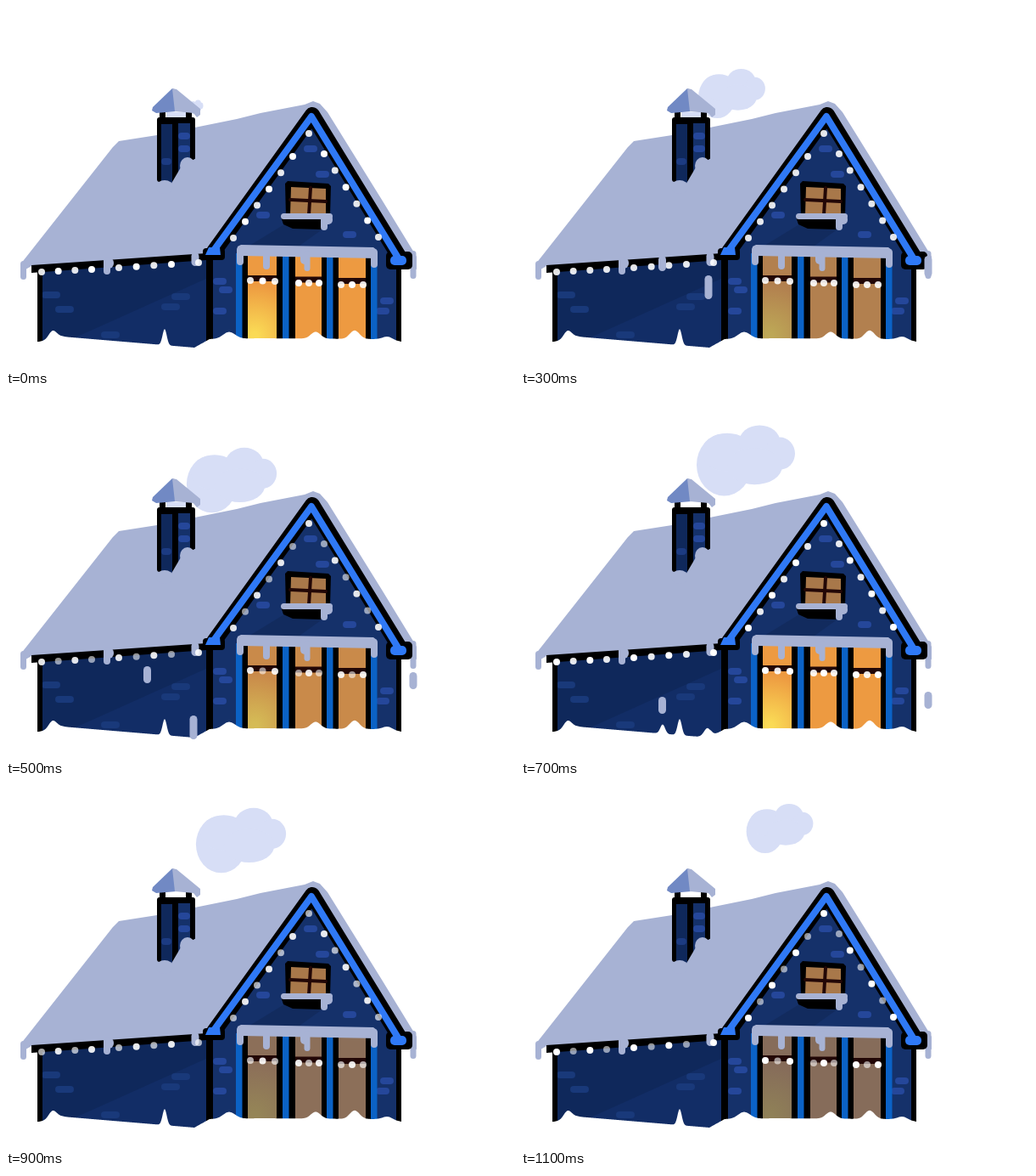
Animation of 600x426 px, one loop 1.2 s. Source, as an HTML page with a canvas:

```html
<!DOCTYPE html>
<html lang="en">
<head>
<meta charset="utf-8">
<title>Snowy house</title>
<style>
html, body { margin: 0; width: 100%; height: 100%; overflow: hidden; background: #fff; }
canvas { display: block; width: 600px; height: 426px; }
</style>
</head>
<body>
<canvas id="stage" width="600" height="426"></canvas>
<script>
const ctx = document.getElementById('stage').getContext('2d');
const SNOW = '#a7b2d4', WALL = '#15316a', SIDE = '#0f285b', TRIM = '#0b62c6';
const BLUE = '#2f79f6', BROWN = '#220706', MIST = '#d7def6';
const STEP = 100, COUNT = 12;

const mix = (a, b, k) => a + (b - a) * k;
const blend = (a, b, k) => 'rgb(' + a.map((v, i) => Math.round(mix(v, b[i], k))) + ')';
const wave = (step, peak, period) => Math.cos((step - peak) / period * 2 * Math.PI);

// Straight-line path through points [at, value, ...]
function along(points, at) {
  let i = 0;
  while (i < points.length - 2 && points[i + 1][0] <= at) i++;
  const a = points[i], b = points[i + 1], k = (at - a[0]) / (b[0] - a[0]);
  return a.slice(1).map((v, j) => mix(v, b[j + 1], k));
}

function rect(color, x1, y1, x2, y2, r = 0) {
  ctx.fillStyle = color;
  ctx.beginPath();
  ctx.roundRect(x1, y1, x2 - x1, y2 - y1, r);
  ctx.fill();
}
function oval(color, x, y, rx, ry = rx) {
  ctx.fillStyle = color;
  ctx.beginPath();
  ctx.ellipse(x, y, rx, ry, 0, 0, Math.PI * 2);
  ctx.fill();
}
function trace(p) {
  ctx.beginPath();
  for (let i = 0; i < p.length; i += 2) ctx.lineTo(p[i], p[i + 1]);
}
function poly(color, ...p) {
  ctx.fillStyle = color;
  trace(p);
  ctx.fill();
}
function line(color, width, ...p) {
  ctx.strokeStyle = color;
  ctx.lineWidth = width;
  ctx.lineJoin = ctx.lineCap = 'round';
  trace(p);
  ctx.stroke();
}
function bricks(color, half, ...spots) {
  for (const [x, y] of spots) rect(color, x - half, y - 4, x + half, y + 4, 4);
}
const icicle = (x, top, bottom, w = 8) => rect(SNOW, x - w / 2, top, x + w / 2, bottom, w / 2);

// The cloud keeps its shape, swells and shrinks, and drifts along a path.
const DRIFT = [[0, 224, 119], [2, 239, 108], [4, 258, 98], [5, 266, 99], [7, 265, 76], [9, 277, 64], [11, 305, 50]];
const PUFFS = [[-.22, .06, .28, .44], [-.19, -.12, .26, .27], [.14, -.26, .21, .24], [.345, -.1, .155, .23], [.09, .08, .28, .26]];

function smoke(step) {
  const [x, y] = along(DRIFT, step), swell = Math.sin(step / 14 * Math.PI);
  const w = 17 + 99 * swell, h = 17 + 66 * swell;
  for (const [dx, dy, rx, ry] of PUFFS) oval(MIST, x + dx * w, y + dy * h, rx * w, ry * h);
}

function sideWall() {
  poly(SIDE, 38, 308, 240, 294, 240, 404, 38, 404);
  poly('#122d66', 82, 390, 238, 320, 238, 404, 82, 404);
  bricks('#19397a', 11, [53, 340], [69, 357], [206, 342], [194, 354], [123, 387]);
  rect('#000', 37, 310, 43, 396);
}

function roof() {
  poly(SNOW, 17, 304, 126, 166, 133, 159, 178, 152, 272, 133, 300, 126, 352, 116, 362, 112,
    370, 115, 379, 125, 443, 228, 484, 295, 484, 310, 460, 304, 360, 150, 240, 293, 30, 306, 18, 313);
  icicle(20.5, 300, 322, 7);
  icicle(480, 288, 321, 7);
  poly('#000', 30, 305, 236, 291, 236, 299, 30, 314);
  icicle(121, 296, 309, 12);
  icicle(119, 296, 316);
  icicle(223, 290, 306, 9);
}

function chimney(step) {
  if (step < 6) rect(MIST, 189, 125, 213, 133);
  for (const x of [181, 212]) rect('#000', x, 122, x + 7, 136);
  rect('#000', 178, 131, 223, 207, 3);
  rect(SIDE, 183, 139, 196, 210);
  rect(WALL, 203, 138, 217, 206);
  bricks('#25479a', 7, [210, 153], [210, 168]);
  bricks('#1c3b82', 6, [189, 183]);
  oval(SNOW, 187, 213, 10, 8);
  oval(SNOW, 214, 188, 9, 10);
  poly(SNOW, 193, 212, 206, 190, 224, 179, 224, 212);
  poly('#7189c4', 196, 97, 173, 119, 172, 123, 177, 126, 201, 124, 201, 99);
  poly(SNOW, 196, 97, 201, 98, 229, 121, 229, 128, 225, 131, 221, 126, 199, 124);
}

function gable() {
  poly(WALL, 360, 142, 462, 296, 466, 404, 237, 404, 237, 293);
  poly('#122b5e', 282, 285, 328, 257, 374, 262, 342, 285);
  bricks('#25479a', 8, [359, 168], [373, 198], [303, 246], [405, 269], [252, 324], [259, 334],
    [252, 359], [449, 347], [444, 359]);
  rect('#000', 236, 296, 244, 398);
  rect('#000', 460, 303, 466, 396);
  rect('#000', 232, 285, 258, 299, 4);
  rect('#000', 448, 289, 479, 310, 5);
  line('#000', 18, 245, 289, 361, 128, 464, 296);
  line(BLUE, 8, 246, 286, 360, 130, 462, 296);
  poly(BLUE, 239, 284, 252, 284, 253, 293, 235, 293);
  rect(BLUE, 453, 294, 472, 305, 5);
}

function smallWindow() {
  poly('#000', 332, 206, 380, 209, 383, 212, 382, 248, 330, 248, 329, 209);
  poly('#a8784a', 336, 213, 377, 215, 377, 246, 335, 246);
  line(BROWN, 4, 359, 214, 357, 246);
  line(BROWN, 4, 335, 228, 377, 230);
  poly('#000', 324, 248, 374, 248, 371, 263, 338, 262, 327, 257);
  rect(SNOW, 324, 244, 385, 251, 3.5);
  rect(SNOW, 371, 246, 385, 257, 5);
  icicle(375, 246, 264);
}

// Lamp fades, flares up again, then goes out.
function glowAt(step) {
  if (step < 4) return 1 - .19 * step;
  if (step < 7) return Math.min(1, .25 + .4 * (step - 4));
  return Math.max(0, 1 - .47 * (step - 7));
}

function doors(glow) {
  const pane = blend([134, 108, 90], [237, 154, 65], glow);
  rect('#000', 275, 288, 434, 398);
  for (const x of [271, 326, 378, 430]) rect(TRIM, x, 291, x + 7.5, 398);
  const fire = ctx.createRadialGradient(293, 388, 4, 293, 388, 60);
  fire.addColorStop(0, blend([143, 128, 87], [250, 218, 85], glow));
  fire.addColorStop(1, pane);
  [[285, 319], [341, 372], [392, 424]].forEach(([x1, x2], i) => {
    rect(i ? pane : fire, x1, 294, x2, 398);
    rect(BROWN, x1, 317 + i * 1.5, x2, 324 + i * 1.5);
  });
  poly(SNOW, 273, 283, 277, 281, 433, 284, 437, 287, 437, 297, 278, 294, 272, 295);
  icicle(276, 283, 305);
  icicle(307, 286, 310);
  icicle(352, 286, 304, 10);
  icicle(355, 288, 312, 7);
  icicle(434, 286, 308);
}

// Every other bulb belongs to the same twinkling group.
function bulbs(step) {
  const light = [1 - .35 * Math.max(0, wave(step, 4, 5)), step ? .79 - .22 * wave(step, 2, 3) : 1];
  const row = (n, x1, y1, x2, y2, first = 0) => {
    for (let i = 0; i < n; i++) {
      const k = n > 1 ? i / (n - 1) : 0;
      oval(`rgba(255,255,255,${light[(i + first) % 2]})`, mix(x1, x2, k), mix(y1, y2, k), 4);
    }
  };
  row(1, 357, 150, 357, 150);
  row(6, 338, 177, 268, 273, 1);
  row(6, 439, 272, 375, 174);
  row(4, 42, 313, 101, 310);
  row(4, 133, 308, 195, 304);
  row(1, 227, 302, 227, 302);
  row(3, 288, 323, 317, 324);
  row(3, 345, 326, 369, 326, 1);
  row(3, 395, 328, 421, 328);
}

// An icicle grows for two steps, breaks off and falls.
function drip(step, x, first, from, length, speed) {
  const age = step - first, fall = age - 2, top = from + fall * speed;
  if (age === 0 || age === 1) icicle(x, 294, from - 6 + age * 11, 9);
  if (fall >= 0 && fall < 4 && top < 380) icicle(x, top, top + length, 9);
}
function drips(step) {
  drip(step, 221, 1, 317, 28, 29.5);
  drip(step, 166.5, 3, 318, 20, 18);
  drip(step, 480, 3, 325, 20, 11.5);
}

const BASE = [[30, 396], [48, 394], [66, 389], [222, 402], [240, 392], [300, 391], [440, 392], [475, 396]];
const MOUNDS = [[55, 10, 7], [187, 19, 3.5], [263, 8, 10], [365, 8, 8], [411, 10, 8], [450, 4, 8]];

function ground(step) {
  const mounds = [...MOUNDS];
  if (step === 7 || step === 8) mounds.push([167, 11, 4], [220, 11, 6]);
  const p = [30, 426];
  for (let x = 30; x <= 475; x++) {
    let y = along(BASE, x)[0];
    for (const [at, h, w] of mounds) y -= h * Math.exp(-(((x - at) / w) ** 2));
    p.push(x, y);
  }
  poly('#fff', ...p, 475, 426);
}

function draw(step) {
  rect('#fff', 0, 0, 600, 426);
  smoke(step);
  sideWall();
  roof();
  chimney(step);
  gable();
  smallWindow();
  doors(glowAt(step));
  bulbs(step);
  ground(step);
  drips(step);
}

const start = performance.now();
function tick() {
  draw(Math.floor((performance.now() - start) / STEP) % COUNT);
  requestAnimationFrame(tick);
}
tick();
</script>
</body>
</html>
```
